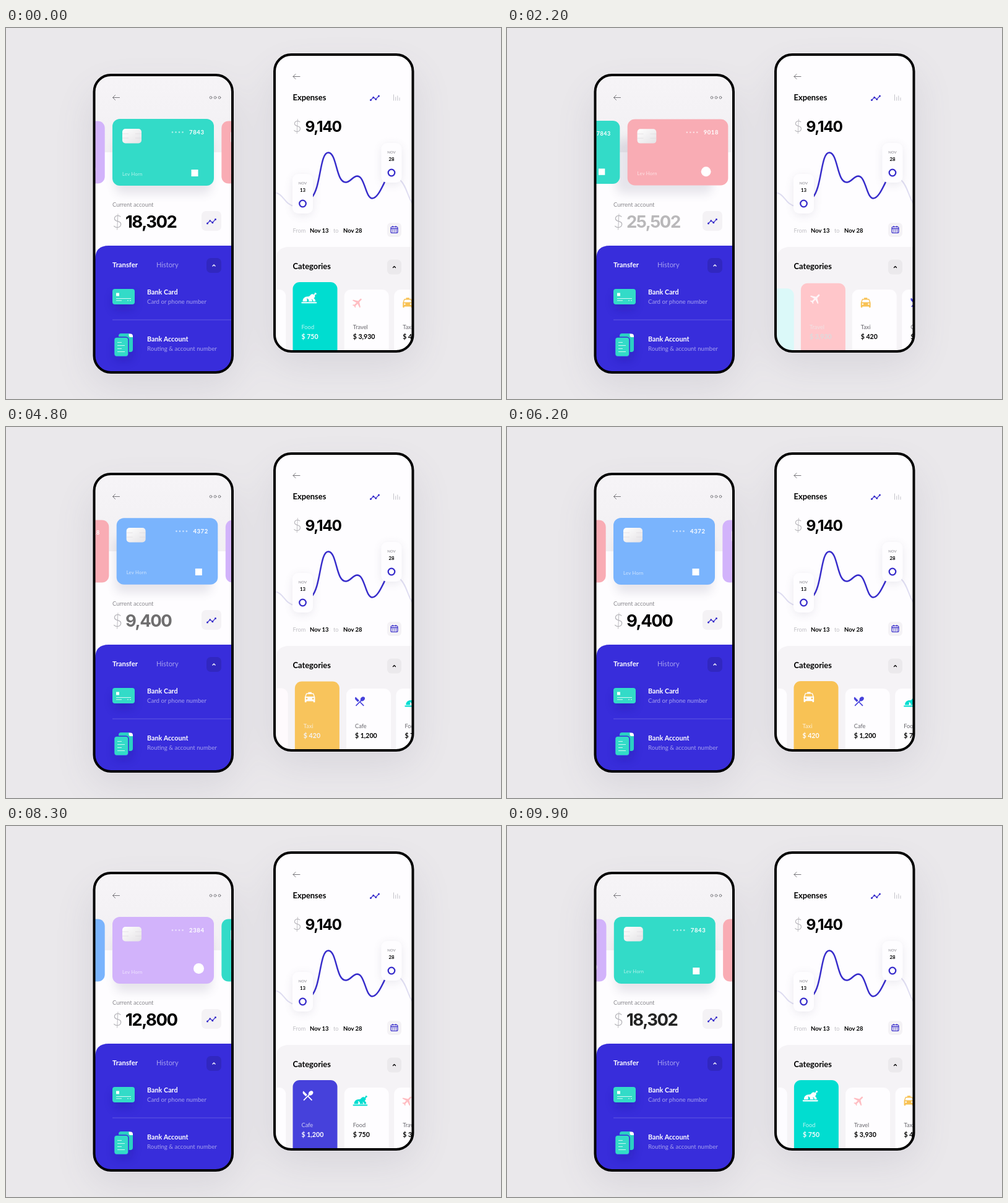
These frames come from a looping animation (800x600 px, 10 s). An HTML page:

```html
<!DOCTYPE html>
<html lang="en">
<head>
<meta charset="utf-8">
<title>Wallet</title>
<style>
html, body { margin: 0; width: 100%; height: 100%; overflow: hidden; background: #eae8eb; }
svg { display: block; width: 800px; height: 600px; font-family: Lato, "Open Sans", sans-serif; }
.b { font-weight: 700; }
.num { font-family: Inter, sans-serif; font-weight: 700; letter-spacing: -.055em; }
.cur { font-family: Lato, sans-serif; font-weight: 300; fill: #b4b3b8; }
.line { fill: none; stroke-linecap: round; stroke-linejoin: round; }
.ink { stroke: #382dcb; }
.grey { stroke: #77767b; }
</style>
</head>
<body>
<svg viewBox="0 0 800 600">
  <defs>
    <clipPath id="screenA"><rect x="142" y="76" width="224" height="481" rx="27"/></clipPath>
    <clipPath id="screenB"><rect x="434" y="43" width="224" height="480" rx="27"/></clipPath>
    <filter id="far" x="-50%" y="-50%" width="200%" height="200%"><feGaussianBlur stdDeviation="30"/></filter>
    <filter id="near" x="-50%" y="-50%" width="200%" height="200%"><feGaussianBlur stdDeviation="8"/></filter>
    <linearGradient id="head" x2="0" y2="1"><stop stop-color="#f6f4f7"/><stop offset="1" stop-color="#f2f0f3"/></linearGradient>
    <linearGradient id="chip" x2="1" y2="1"><stop stop-color="#fff"/><stop offset="1" stop-color="#e4e2e5"/></linearGradient>
    <g id="back"><path class="line grey" d="M11.5 0H.5M4.5-4L.5 0L4.500 4"/></g>
    <g id="trend">
      <path class="line ink" stroke-width="1.2" d="M-6.500 3.500L-2.200-.8L1.800 2.200L6.500-3"/>
      <g fill="#382dcb"><circle cx="-6.500" cy="3.500" r="1.500"/><circle cx="-2.200" cy="-.8" r="1.500"/><circle cx="1.800" cy="2.200" r="1.500"/><circle cx="6.500" cy="-3" r="1.500"/></g>
    </g>
    <path id="up" class="line" stroke-width="1.300" d="M-2 1L0-1L2 1"/>
    <path id="food" d="M0 15h23.500v1.200q0 .8-.8.8H.8q-.8 0-.8-.8zM2 14C1.500 9 6 6 10.500 6.500C12.500 6.500 13 4.500 14.500 3.500C16 2.200 18 2.800 19 3.500L20.200 2.300C19.700.6 21.500-.3 22.200 1C23.800 1.300 23.500 3.300 21.700 3.400L20.500 4.600C21.300 6.500 20.500 8 19 9C21 10.500 21.800 12 21.500 14H18C18 12 17 10.500 15 10.500C16.500 11.500 16.800 13 16.500 14H11C12 12 10.500 9.500 8 9.500C9 11 9 13 8 14z"/>
    <path id="plane" transform="rotate(45 8 8.500) translate(-2.200-1.500) scale(.87)" d="M21 16v-2l-8-5V3.500c0-.83-.67-1.500-1.500-1.500S10 2.670 10 3.500V9l-8 5v2l8-2.500V19l-2 1.500V22l3.500-1 3.500 1v-1.500L13 19v-5.500l8 2.500z"/>
    <path id="taxi" transform="translate(-2.600-1.800) scale(.88)" d="M18.920 6C18.720 5.420 18.160 5 17.500 5H15V3H9v2H6.500c-.66 0-1.210.42-1.420 1L3 12v8c0 .55.45 1 1 1h1c.55 0 1-.45 1-1v-1h12v1c0 .55.45 1 1 1h1c.55 0 1-.45 1-1v-8zM6.500 16a1.500 1.500 0 1 1 0-3a1.500 1.500 0 0 1 0 3zm11 0a1.500 1.500 0 1 1 0-3a1.500 1.500 0 0 1 0 3zM5 11l1.500-4.500h11L19 11z"/>
    <path id="cafe" transform="translate(-2.200-2) scale(.84)" d="M8.100 13.340l2.830-2.830L3.910 3.500c-1.560 1.560-1.560 4.090 0 5.660zm6.780-1.810c1.530.71 3.680.21 5.270-1.380 1.910-1.910 2.280-4.650.81-6.120-1.460-1.460-4.200-1.100-6.120.81-1.590 1.590-2.090 3.740-1.380 5.270L3.700 19.870l1.410 1.410L12 14.410l6.880 6.880 1.410-1.410L13.410 13z"/>
  </defs>

  <g filter="url(#far)" fill="#4a4468" opacity=".11">
    <rect x="135" y="100" width="238" height="480" rx="40"/>
    <rect x="427" y="67" width="238" height="480" rx="40"/>
  </g>

  <!-- wallet -->
  <g clip-path="url(#screenA)">
    <rect x="142" y="76" width="224" height="482" fill="#fefdff"/>
    <rect x="142" y="76" width="224" height="125" fill="url(#head)"/>
    <use href="#back" x="172" y="112.500"/>
    <g class="line grey" stroke-width=".9"><circle cx="331" cy="112.500" r="1.900"/><circle cx="338" cy="112.500" r="1.900"/><circle cx="345" cy="112.500" r="1.900"/></g>
    <rect x="176" y="180" width="156" height="88" rx="12" fill="#4a4468" opacity=".13" filter="url(#near)"/>
    <g id="cards"></g>
    <text x="172" y="288.500" font-size="9.400" fill="#88878c">Current account</text>
    <text class="cur" x="172" y="322.500" font-size="28">$</text>
    <text class="num" id="sum" x="193" y="322.500" font-size="27.500"></text>
    <rect x="316" y="296" width="32" height="32" rx="7" fill="#f4f2f5"/>
    <use href="#trend" x="332" y="312.500"/>
    <path d="M144 558V374Q144 352 166 352H366V558z" fill="#382ddb"/>
    <g fill="#fff">
      <text class="b" x="172" y="387.300" font-size="11.300">Transfer</text>
      <text x="243" y="387.300" font-size="11" opacity=".55">History</text>
      <text class="b" x="228" y="430.800" font-size="10.800">Bank Card</text>
      <text x="228" y="446" font-size="9.700" opacity=".55">Card or phone number</text>
      <text class="b" x="228" y="506.600" font-size="10.800">Bank Account</text>
      <text x="228" y="521.600" font-size="9.600" opacity=".55">Routing &amp; account number</text>
    </g>
    <rect x="324" y="372" width="24" height="24" rx="7" fill="#3127c0"/>
    <use href="#up" x="336" y="384" stroke="#fff"/>
    <path d="M172 472H366" stroke="#fff" opacity=".2"/>
    <g fill="#191080" opacity=".3" filter="url(#near)"><rect x="174" y="430" width="32" height="24"/><rect x="177" y="508" width="26" height="28"/></g>
    <rect x="172" y="422" width="36" height="25" rx="4" fill="#33dbc8"/>
    <rect x="178" y="428.500" width="5" height="5" fill="#fff"/>
    <path d="M178 437.500H202M178 440.800H187M196 440.800H198M200 440.800H202" stroke="#fff" opacity=".8"/>
    <path d="M186 494H199L205 500V520Q205 524 201 524H186Q182 524 182 520V498Q182 494 186 494z" fill="#2bd0c3"/>
    <path d="M198.500 494.500H201Q205 494.500 205 498.500V500H201Q198.500 500 198.500 497z" fill="#fff"/>
    <rect x="174.500" y="500" width="23.500" height="31.500" rx="4.500" fill="#33dbc8" stroke="#382ddb" stroke-width="1.600"/>
    <path d="M180 508.500H187M180 513.500H192M180 518.500H187M180 523.500H192" stroke="#fff" opacity=".75"/>
  </g>
  <rect x="142.500" y="76" width="223.500" height="481" rx="27" fill="none" stroke="#000" stroke-width="4"/>

  <!-- expenses -->
  <g clip-path="url(#screenB)">
    <rect x="434" y="43" width="224" height="480" fill="#fefdff"/>
    <use href="#back" x="463.500" y="78.500"/>
    <text class="b" x="463.500" y="116.700" font-size="12.900">Expenses</text>
    <use href="#trend" x="596" y="113"/>
    <path d="M626.500 107.500V117.500M629.700 111.500V117.500M632.800 109.500V117.500M636 112.500V117.500" stroke="#c4c3c9"/>
    <text class="cur" x="463.500" y="167.800" font-size="24.500">$</text>
    <text class="num" x="483.500" y="167.800" font-size="24.500">9,140</text>
    <path class="line" stroke="#dfddf1" stroke-width="2" d="M436 266.500C448 268 451 286 466 288M636 245C647 254 649 273 657 284"/>
    <path class="line ink" stroke-width="2.500" d="M494 274C509 259 507 201 521 201.500C535 202 533 249.500 549 249.500C557 249.500 560 239.500 568 239.500C580 240 581 275.500 592 275.500C600 275.500 607 259 613 247"/>
    <g id="pins"></g>
    <g font-size="9.200">
      <text x="463.500" y="331" fill="#c0bfc4">From</text>
      <text class="b" x="491" y="331" font-size="9.500">Nov 13</text>
      <text x="529" y="331" fill="#c0bfc4">to</text>
      <text class="b" x="545" y="331" font-size="9.500">Nov 28</text>
    </g>
    <rect x="616" y="315" width="23" height="23" rx="6" fill="#f4f2f5"/>
    <rect class="line ink" x="622" y="321.500" width="11" height="10" rx="2" stroke-width="1.200"/>
    <path class="ink" stroke-width="1.300" d="M622 324.500H633M625 320V322.500M630 320V322.500"/>
    <path class="ink" stroke-width="1.300" stroke-dasharray="1.300 1.500" d="M624.300 327H631.500M624.300 329.500H631.500"/>
    <path d="M436 524V376Q436 354 458 354H658V524z" fill="#f5f3f6"/>
    <text class="b" x="463.500" y="390.300" font-size="12.900">Categories</text>
    <rect x="616" y="374.500" width="23" height="24" rx="6.500" fill="#ebe9ec"/>
    <use href="#up" x="627.500" y="386.500" stroke="#000"/>
    <g id="tiles"></g>
  </g>
  <rect x="434" y="43" width="223.500" height="480" rx="27" fill="none" stroke="#000" stroke-width="4"/>
</svg>
<script>
const get = id => document.getElementById(id);
const STEP = 2500, LOOP = 10000;

const cards = [
  { color: '#33dbc8', digits: '7843', sum: '18,302', mark: '<rect x="45.500" y="28" width="11" height="11"/>' },
  { color: '#f9acb4', digits: '9018', sum: '25,502', mark: '<circle cx="46" cy="31.500" r="8"/>' },
  { color: '#7ab4fd', digits: '4372', sum: '9,400', mark: '<rect x="45.500" y="28" width="11" height="11"/>' },
  { color: '#d2b3fb', digits: '2384', sum: '12,800', mark: '<circle cx="57.500" cy="29.500" r="8.500"/>' }
];
const tiles = [
  { icon: 'food', name: 'Food', cost: '750', rgb: [0, 221, 208], inset: 0 },
  { icon: 'plane', name: 'Travel', cost: '3,930', rgb: [255, 189, 194], inset: 2 },
  { icon: 'taxi', name: 'Taxi', cost: '420', rgb: [248, 194, 85], inset: 2 },
  { icon: 'cafe', name: 'Cafe', cost: '1,200', rgb: [70, 65, 219], inset: 2 }
];
const WHITE = [254, 253, 255], BLACK = [0, 0, 0], GREY = [105, 104, 110];

get('cards').innerHTML = cards.map(c => `<g>
  <rect x="-82" y="-54" width="164" height="108" rx="12" fill="${c.color}"/>
  <rect x="-66" y="-38" width="31" height="23.500" rx="5" fill="url(#chip)"/>
  <path d="M-66-30H-56M-66-23H-56M-45-30H-35M-45-23H-35" stroke="#d8d6da" stroke-width=".6"/>
  <g fill="#fff">
    <g opacity=".6">${[15, 20.500, 26, 31.500].map(x => `<circle cx="${x}" cy="-32.500" r="1.300"/>`).join('')}</g>
    <text x="66.500" y="-29" text-anchor="end" class="b" font-size="9.500" letter-spacing=".6">${c.digits}</text>
    <text x="-66" y="37.500" font-size="7.600" letter-spacing=".3" opacity=".65">Lev Horn</text>
    ${c.mark}
  </g></g>`).join('');

get('pins').innerHTML = [[479.500, 284, 13], [623, 234, 28]].map(([x, y, day]) => `
  <rect x="${x - 15}" y="${y - 44}" width="30" height="62" rx="9" fill="#4a4468" opacity=".13" filter="url(#near)"/>
  <rect x="${x - 16.500}" y="${y - 48}" width="33" height="64" rx="9" fill="#fefdff"/>
  <g class="b" text-anchor="middle">
    <text x="${x}" y="${y - 31}" font-size="6" fill="#a3a2a8">NOV</text>
    <text x="${x}" y="${y - 19}" font-size="7.800">${day}</text>
  </g>
  <circle class="line ink" cx="${x}" cy="${y}" r="5.300" stroke-width="2.300"/>`).join('');

// Five neighbouring tiles are visible at most; each is refilled as the row advances.
get('tiles').innerHTML = '<g><rect width="72" height="120" rx="11"/><use/><text x="14" y="486.500" font-size="9.300"/><text class="b" x="14" y="502.600" font-size="10.600"/></g>'.repeat(5);

const clamp = (v, lo, hi) => Math.min(hi, Math.max(lo, v));
const ramp = (v, from, to) => clamp((v - from) / (to - from), 0, 1);
const ease = x => x < .5 ? 4 * x ** 3 : 1 - 4 * (1 - x) ** 3;
const mix = (a, b, k) => `rgb(${a.map((v, i) => Math.round(v + (b[i] - v) * k))})`;
const set = (el, attrs) => { for (const k in attrs) el.setAttribute(k, attrs[k]); };

function drawCards(pos) {
  [...get('cards').children].forEach((el, i) => {
    const slot = (i - pos + 6) % 4 - 2;
    const scale = 1 - .065 * Math.min(1, Math.abs(slot));
    set(el, { transform: `translate(${254 + 171 * slot} 201) scale(${scale})` });
  });
}

function drawTiles(pos) {
  const first = Math.floor(pos) - 1;
  [...get('tiles').children].forEach((el, i) => {
    const tile = tiles[(first + i + 4) % 4], slot = first + i - pos;
    const on = Math.max(0, 1 - Math.abs(slot));
    const [box, icon, name, cost] = el.children;
    set(el, { transform: `translate(${463.5 + slot * 80.5 + clamp(slot, -1, 1) * 2.7} 0)` });
    set(box, { y: 423 - 12 * on, fill: mix(WHITE, tile.rgb, on) });
    set(icon, {
      href: '#' + tile.icon, fill: mix(tile.rgb, WHITE, on),
      transform: `translate(${14 + tile.inset * on} ${435.500 - 8 * on}) scale(${1 + .05 * on})`
    });
    set(name, { fill: mix(GREY, WHITE, on), 'fill-opacity': 1 - .25 * on });
    set(cost, { fill: mix(BLACK, WHITE, on) });
    name.textContent = tile.name;
    cost.textContent = '$ ' + tile.cost;
  });
}

function draw(now) {
  const t = now % LOOP, index = Math.floor(t / STEP), local = t % STEP;
  drawCards(index + ease(ramp(local, 1560, 2500)));
  drawTiles(index + ease(ramp(local, 1580, 2500)));
  const next = local > 2060;
  get('sum').textContent = cards[(index + next) % 4].sum;
  set(get('sum'), { opacity: next ? ramp(local, 2110, 2450) : 1 - ramp(local, 1700, 2050) });
}

function loop() {
  draw(performance.now());
  requestAnimationFrame(loop);
}
loop();
</script>
</body>
</html>
```
